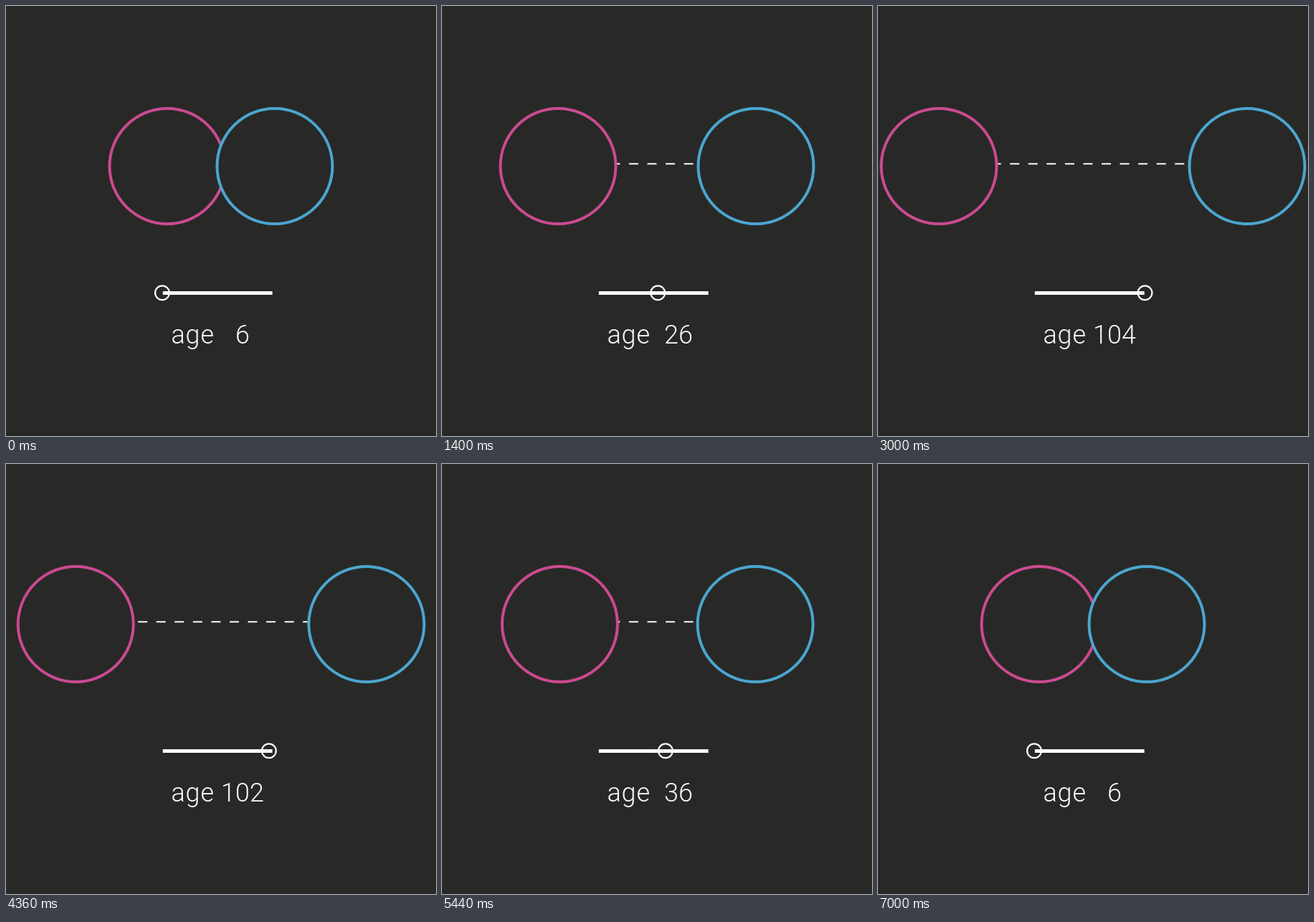
An HTML page that plays this animation: 600 px wide and 600 px high, repeating every 8.04 s.

```html
<!DOCTYPE html>
<html lang="en">
<head>
<meta charset="utf-8">
<title>Age</title>
<style>
  html, body { margin: 0; width: 100%; height: 100%; overflow: hidden; background: #282927; }
  svg { display: block; width: 100%; height: 100%; }
  text { font: 300 36px Roboto, "Noto Sans", sans-serif; fill: #f5fbf7; }
</style>
</head>
<body>
<svg viewBox="0 0 600 600">
  <rect width="600" height="600" fill="#282927"/>
  <path d="M158.6 220.2H440" stroke="#f5fbf7" stroke-width="2" stroke-dasharray="13 12.57"/>
  <g fill="#282927" stroke-width="4">
    <circle id="pink" cx="225" cy="223.5" r="80.5" stroke="#cb4a91"/>
    <circle id="blue" cx="375" cy="223.5" r="80.5" stroke="#4ba6cf"/>
  </g>
  <g fill="none" stroke="#f5fbf7">
    <path d="M218.8 400.5H371.7" stroke-width="4.8"/>
    <circle id="knob" cx="218" cy="400.3" r="9.9" stroke-width="2.3"/>
  </g>
  <text x="230.5" y="470.5" letter-spacing="0.8">age</text>
  <text id="age" x="330" y="470.5" text-anchor="middle">6</text>
</svg>
<script>
const LOOP = 8040, STEP = 40, MOVE = 3000, RETURN = 4000;
const [pink, blue, knob, age] = ['pink', 'blue', 'knob', 'age'].map(id => document.getElementById(id));

// Eased value with flat ends; x1 and x2 are the time handles of the curve.
function ease(u, x1, x2) {
  if (u <= 0) return 0;
  if (u >= 1) return 1;
  let lo = 0, hi = 1;
  for (let i = 0; i < 30; i++) {
    const s = (lo + hi) / 2, r = 1 - s;
    if (3 * r * r * s * x1 + 3 * r * s * s * x2 + s * s * s < u) lo = s;
    else hi = s;
  }
  return lo * lo * (3 - 2 * lo);
}

const lerp = (a, b, k) => a + (b - a) * k;

function draw(time) {
  const t = Math.floor((time % LOOP) / STEP) * STEP;
  const back = t >= RETURN;
  const u = Math.min(1, (back ? t - RETURN : t) / MOVE);
  const w = back ? 1 - u : u;

  if (back) {
    // The pink path runs slightly past its end point and turns round.
    const k = ease(u, 1 / 6, 2 / 3), d = 142.8 * k;
    pink.setAttribute('cx', 85 + Math.min(d, 282.8 - d));
    blue.setAttribute('cx', lerp(515, 375, k));
  } else {
    const k = ease(u, 1 / 3, 2 / 3);
    pink.setAttribute('cx', lerp(225, 85, k));
    blue.setAttribute('cx', lerp(375, 515, k));
  }

  knob.setAttribute('cx', lerp(218, 372.5, ease(w, 1 / 6, 2 / 3)));
  const years = back ? ease(w, 0.805, 0.45) : ease(w, 0.83, 0.44);
  age.textContent = Math.round(lerp(6, 104, years));
}

const start = performance.now();
function tick() {
  draw(performance.now() - start);
  requestAnimationFrame(tick);
}
tick();
</script>
</body>
</html>
```
